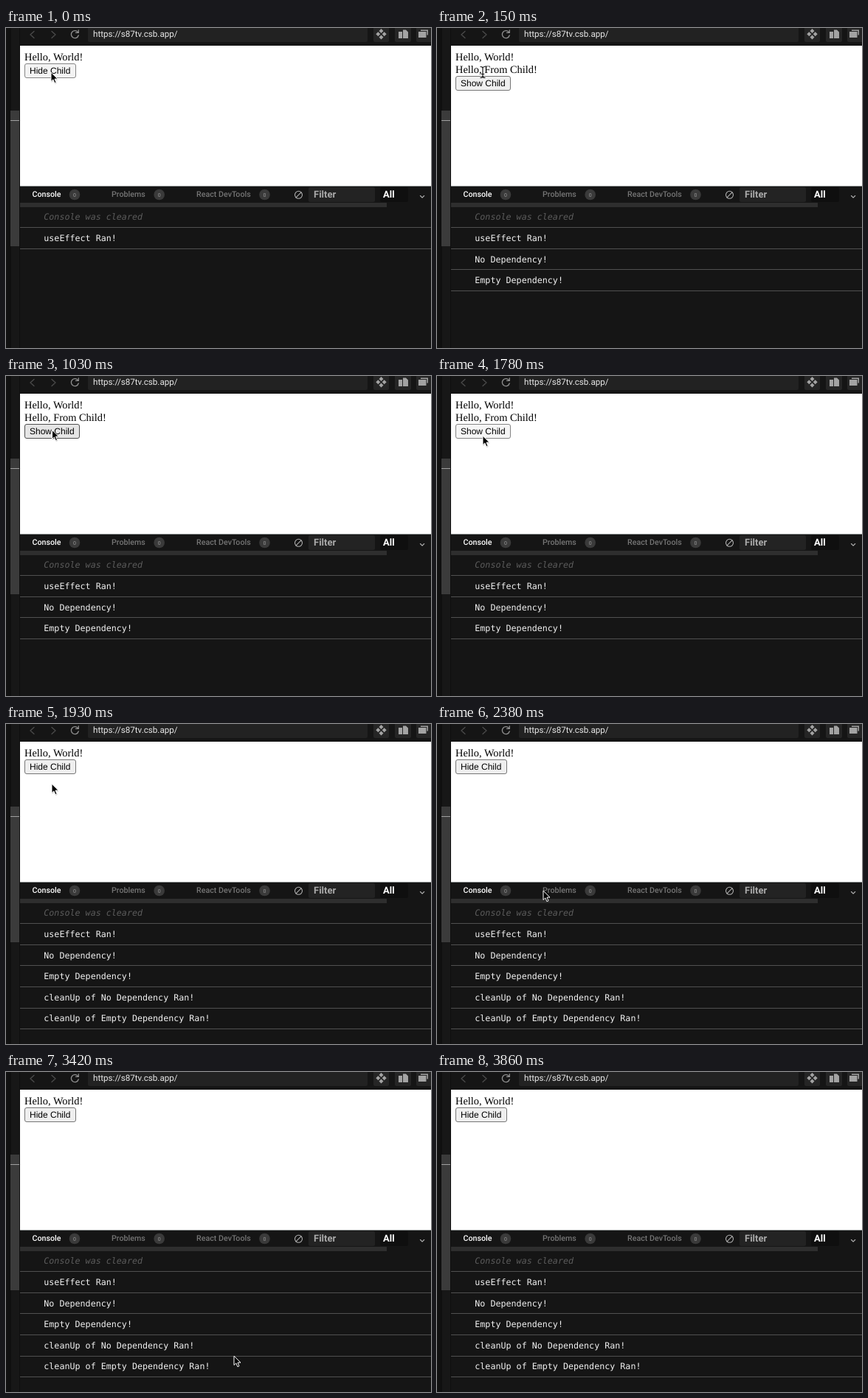
These frames come from a looping animation (576x434 px, 4610 ms). An HTML page:

```html
<!DOCTYPE html>
<html lang="en">
<head>
<meta charset="utf-8">
<title>Effect cleanup demo</title>
<style>
  html, body { margin: 0; width: 100%; height: 100%; overflow: hidden; background: #151515; }
  svg { display: block; width: 576px; height: 434px; }
  text { text-rendering: geometricPrecision; white-space: pre; }
  .ui { font-family: Roboto, sans-serif; }
  .tab { font-size: 10.7px; font-weight: 500; fill: #757575; }
  .bold { font-size: 13px; font-weight: 700; }
  .badge { font-size: 7px; fill: #999; text-anchor: middle; }
  .page { font: 14.4px "Liberation Serif", Times, serif; fill: #000; }
  .btn { font: 12px "Liberation Sans", Arial, sans-serif; fill: #000; }
  .log { font: 11.7px "DejaVu Sans Mono", monospace; fill: #f2f2f2; }
  .cleared { font-style: italic; fill: #5c5c5c; }
  .line { fill: none; stroke-linecap: round; stroke-linejoin: round; }
</style>
</head>
<body>
<svg viewBox="0 0 576 434">
  <rect width="576" height="434" fill="#151515"/>

  <!-- left gutter -->
  <rect width="6" height="434" fill="#111"/>
  <rect x="6" width="13" height="434" fill="#171717"/>
  <rect x="5.5" width="1" height="434" fill="#0c0c0c"/>
  <rect x="18" width="1" height="434" fill="#0e0e0e"/>
  <rect x="6" y="112" width="12" height="184" fill="#3b3b3b"/>
  <rect x="6" y="125" width="12" height="1" fill="#a0a0a0"/>

  <!-- address bar -->
  <g class="line" stroke="#4b4b4b" stroke-width="1.3">
    <path d="M38 4.5L33 9l5 4.5M62 4.5L67 9l-5 4.5"/>
    <path stroke="#909090" d="M97.6 6A5 5 0 1 0 98.2 10M98.3 2.8V6.4H94.6"/>
  </g>
  <path d="M111 0H490V17q0 2-2 2H113q-2 0-2-2Z" fill="#222"/>
  <text class="ui" x="118" y="12" font-size="11.65" fill="#e8e8e8">https://s87tv.csb.app/</text>
  <g fill="#252525">
    <path d="M498 0h21v17q0 2-2 2h-17q-2 0-2-2Z"/>
    <path d="M527 0h22v17q0 2-2 2h-18q-2 0-2-2Z"/>
    <path d="M556 0h20v19h-18q-2 0-2-2Z"/>
  </g>
  <g fill="#a3a3a3">
    <path d="M508.5 1l3 3-3 3-3-3ZM504.3 5.2l3 3-3 3-3-3ZM512.7 5.2l3 3-3 3-3-3ZM508.5 9.4l3 3-3 3-3-3Z"/>
    <path d="M532 5h5v9h-5ZM538 2.5h4l3 3V14h-7Z"/>
    <path d="M562 2.5h10v7h-1.5V4H562ZM559 5h10.5v8H559Z"/>
  </g>

  <!-- preview -->
  <rect x="19" y="24" width="557" height="190" fill="#fff"/>
  <rect x="19" y="214" width="557" height="1" fill="#8b9090"/>
  <text class="page" x="25" y="44">Hello, World!</text>
  <text class="page" id="child" x="25" y="61">Hello, From Child!</text>
  <g id="button">
    <rect x="25.5" y=".5" width="69" height="19" rx="2.5"/>
    <text class="btn" x="32" y="14"></text>
  </g>

  <!-- console header -->
  <g class="ui" id="tabs">
    <rect x="410" y="216" width="90" height="20" rx="2" fill="#232323"/>
    <rect x="507" y="216" width="38" height="20" rx="2" fill="#0f0f0f"/>
    <text class="bold" x="417" y="230" fill="#aaa">Filter</text>
    <text class="bold" x="511" y="230" fill="#fff">All</text>
  </g>
  <g class="line" stroke="#b0b0b0" stroke-width="1.1">
    <circle cx="396.5" cy="226.3" r="5"/>
    <path d="M393 229.8l7-7M561.5 227.5l2.6 2.6 2.6-2.6"/>
  </g>
  <rect x="19" y="237" width="497" height="6" fill="#2e2e2e"/>
  <g id="logs"></g>

  <g id="arrow">
    <path d="M1.5 2.3V15L4.4 12.3l2 4.6 2.3-1-2-4.5h4Z" fill="#000" opacity=".2"/>
    <path d="M1 1.2V13.5L3.9 10.9l2 4.8 2.1-.9-2-4.7H10Z" fill="#000" stroke="#fff" stroke-linejoin="round"/>
  </g>
  <g id="beam" class="line">
    <path d="M-3-7.5Q0-7.5 0-5.5Q0-7.5 3-7.5M0-5.5V5.5M-3 7.5Q0 7.5 0 5.5Q0 7.5 3 7.5M-1.8 2.5H1.8" stroke="#111" stroke-width="1.2"/>
  </g>
</svg>
<script>
const LOOP = 4610;
const $ = id => document.getElementById(id);
const clip = (el, on) => el.setAttribute("visibility", on ? "visible" : "hidden");

// [start ms, cursor, x, y]
const cursorSteps = [
  [0, "arrow", 60, 59], [150, "beam", 62, 60], [590, "beam", 62, 66],
  [740, "arrow", 61, 65], [890, "arrow", 61, 67], [1030, "arrow", 61.5, 72],
  [1180, "arrow", 61, 78], [1330, "arrow", 61, 80], [2230, "arrow", 69, 97],
  [2380, "arrow", 143, 225], [2530, "arrow", 189, 305], [2680, "arrow", 221, 345],
  [2820, "arrow", 239, 368], [2970, "arrow", 243, 378], [3420, "arrow", 308, 384],
  [3560, "arrow", 474, 405], [3710, "arrow", 475, 408], [3860, "none", 0, 0]
];

// [start ms, child shown, fill, border]
const pageSteps = [
  [0, false, "#f3f3f3", "#858585"],
  [150, true, "#efefef", "#767676"],
  [740, true, "#e5e5e5", "#4f4f4f"],
  [1780, true, "#f5f5f5", "#858585"],
  [1930, false, "#efefef", "#767676"]
];

// [start ms, text, baseline, rule below]
const logs = [
  [0, "Console was cleared", 260, 270],
  [0, "useEffect Ran!", 289, 299],
  [150, "No Dependency!", 318, 327],
  [150, "Empty Dependency!", 346, 356],
  [1930, "cleanUp of No Dependency Ran!", 375, 385],
  [1930, "cleanUp of Empty Dependency Ran!", 403, 413]
];

$("logs").innerHTML = logs.map(([, text, y, rule], i) => `<g>
  <text class="log ${i ? "" : "cleared"}" x="51.3" y="${y}">${text}</text>
  <rect x="19" y="${rule}" width="557" height="1" fill="#505050"/></g>`).join("");

$("tabs").innerHTML += [["Console", 35.5, 93], ["Problems", 143, 207.7], ["React DevTools", 258, 350.5]]
  .map(([name, x, cx], i) => `
  <text class="tab" x="${x}" y="229" ${i ? "" : 'style="fill:#fff"'}>${name}</text>
  <circle cx="${cx}" cy="226" r="7.3" fill="#3a3a3a"/>
  <text class="badge" x="${cx}" y="228.5">0</text>`).join("");

const stepAt = (steps, t) => steps.filter(s => s[0] <= t).pop();
const [face, label] = $("button").children;

function draw(t) {
  const [, shown, fill, border] = stepAt(pageSteps, t);
  clip($("child"), shown);
  $("button").setAttribute("transform", `translate(0 ${shown ? 65 : 48})`);
  face.setAttribute("width", shown ? 74 : 69);
  face.setAttribute("fill", fill);
  face.setAttribute("stroke", border);
  label.textContent = shown ? "Show Child" : "Hide Child";

  logs.forEach(([start], i) => clip($("logs").children[i], t >= start));

  const [, kind, x, y] = stepAt(cursorSteps, t);
  for (const id of ["arrow", "beam"]) {
    clip($(id), id === kind);
    $(id).setAttribute("transform", `translate(${x} ${y})`);
  }
}

const origin = performance.now();
function tick() {
  draw((performance.now() - origin) % LOOP);
  requestAnimationFrame(tick);
}
tick();
</script>
</body>
</html>
```
